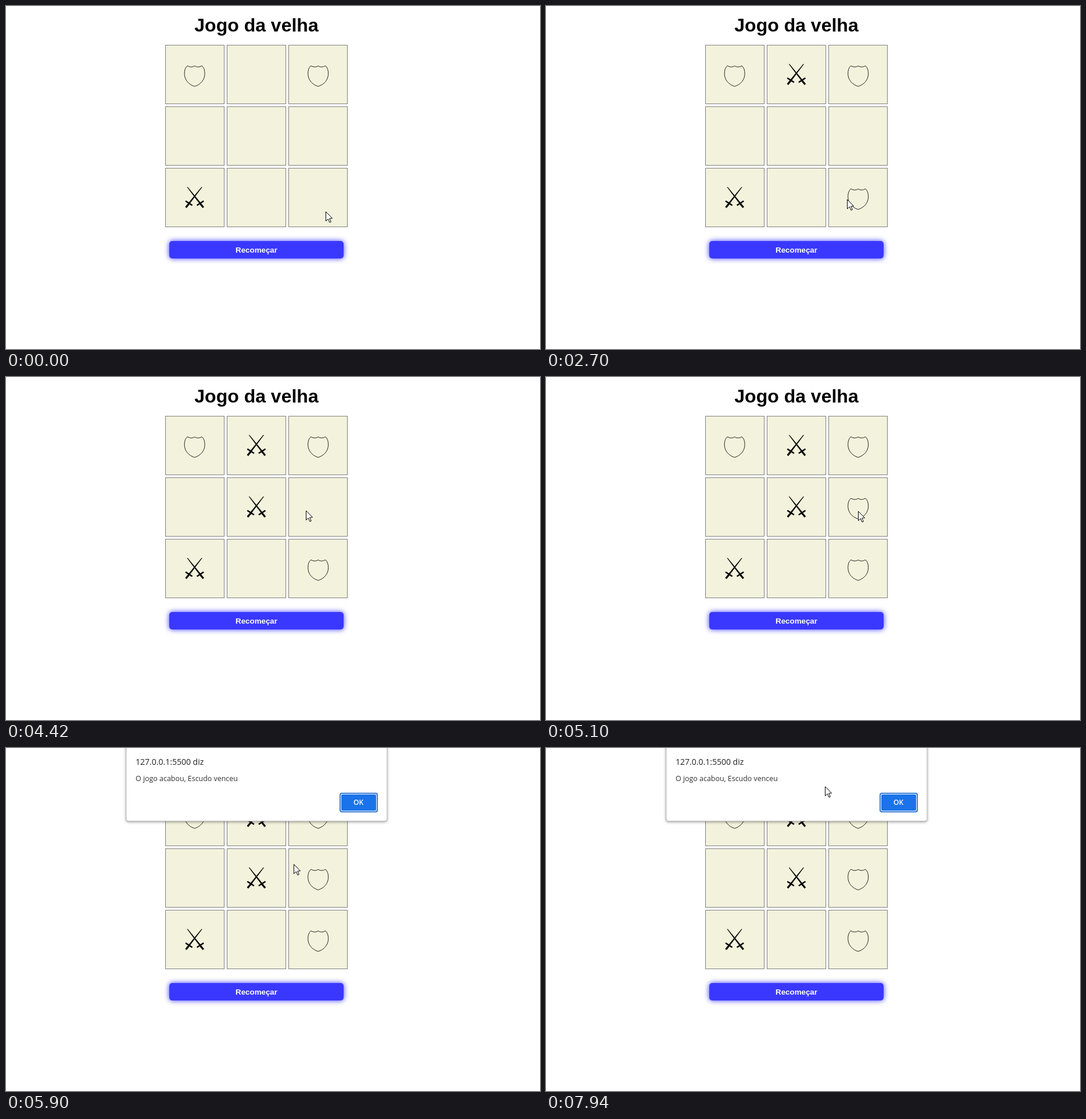
These frames come from a looping animation (919 by 591 pixels, 7.99 s). An HTML page with a canvas:

```html
<!DOCTYPE html>
<html lang="pt">
<head>
<meta charset="utf-8">
<title>Jogo da velha</title>
<style>
  html, body { margin: 0; width: 100%; height: 100%; overflow: hidden; background: #fff; }
  canvas { display: block; }
</style>
</head>
<body>
<canvas id="stage" width="919" height="591"></canvas>
<script>
const ctx = document.getElementById('stage').getContext('2d');
const LOOP = 7990;
const ARIAL = '"Liberation Sans", Arial, sans-serif';
const DIALOG_FONT = '"Open Sans", "Noto Sans", sans-serif';

const smooth = u => u * u * (3 - 2 * u);
const out = power => u => 1 - (1 - u) ** power;

// Pointer moves: first step, last step, destination, easing
const START = [550, 354];
const moves = [
  [70, 70, 431, 140],
  [520, 600, 431, 122],
  [1320, 2090, 511, 309],
  [2160, 2300, 518, 333],
  [3100, 3860, 431, 236],
  [3930, 3930, 431, 239],
  [4140, 4420, 516, 230],
  [4490, 4700, 537, 231, out(1.5)],
  [5700, 6390, 306, 62],
  [6460, 6460, 301, 66],
  [6530, 6820, 234, 66, out(1.63)],
  [7020, 7790, 414, 62],
  [7860, 7860, 446, 66],
  [7940, 7940, 480, 66]
];

// Pieces: drawing, column, row, time of the click
const pieces = [
  [shield, 0, 0, -100], [shield, 2, 0, -100], [swords, 0, 2, -100],
  [swords, 1, 0, 920], [shield, 2, 2, 2630],
  [swords, 1, 1, 4000], [shield, 2, 1, 5030]
];

function pointerAt(t) {
  let [x, y] = START;
  for (const [from, to, tx, ty, ease = smooth] of moves) {
    if (t < from) break;
    const count = Math.round((to - from) / 70) + 1;
    const step = (to - from) / (count - 1) || 1;
    const k = Math.min(count, Math.floor((t - from) / step + 0.01) + 1);
    const u = ease(k / count);
    x += (tx - x) * u;
    y += (ty - y) * u;
  }
  return [Math.round(x), Math.round(y)];
}

function polygon(points) {
  ctx.beginPath();
  points.forEach(([x, y]) => ctx.lineTo(x, y));
  ctx.closePath();
}

function box(x, y, w, h, radius, fill) {
  ctx.beginPath();
  ctx.roundRect(x, y, w, h, radius);
  ctx.fillStyle = fill;
  ctx.fill();
}

function text(str, x, y, font, color, align = 'left') {
  ctx.font = font;
  ctx.fillStyle = color;
  ctx.textAlign = align;
  ctx.fillText(str, x, y);
}

function glow(color, blur, dy = 0) {
  ctx.shadowColor = color;
  ctx.shadowBlur = blur;
  ctx.shadowOffsetY = dy;
}

function shield() {
  ctx.beginPath();
  ctx.moveTo(0, 35.5);
  for (const s of [-1, 1]) {
    ctx.moveTo(0, 36);
    ctx.bezierCurveTo(s * 10, 33, s * 17.5, 25, s * 17.5, 14);
    ctx.bezierCurveTo(s * 17.5, 8, s * 16, 3.5, s * 12.5, 0.5);
    ctx.quadraticCurveTo(s * 6, 4.5, 0, 0.8);
  }
  ctx.strokeStyle = '#222';
  ctx.lineWidth = 1;
  ctx.stroke();
}

function swords() {
  ctx.fillStyle = '#000';
  ctx.strokeStyle = '#000';
  ctx.lineWidth = 2.6;
  for (const s of [-1, 1]) {
    polygon([[s * 13.3, -2.8], [s * 11.7, -2.6], [-s * 16.2, 31.6], [-s * 13.8, 33.4]]);
    ctx.fill();
    ctx.beginPath();
    ctx.moveTo(s * 15.6, 21.5);
    ctx.lineTo(s * 4, 29);
    ctx.moveTo(s * 10, 27);
    ctx.lineTo(s * 15, 32.7);
    ctx.stroke();
  }
}

function drawBoard(t) {
  text('Jogo da velha', 431, 44, 'bold 32px ' + ARIAL, '#000', 'center');
  for (let i = 0; i < 9; i++) {
    const x = 274 + (i % 3) * 106, y = 67 + Math.floor(i / 3) * 106;
    ctx.fillStyle = '#808080';
    ctx.fillRect(x, y, 102, 102);
    ctx.fillStyle = '#f3f2dc';
    ctx.fillRect(x + 1, y + 1, 100, 100);
  }
  for (const [draw, col, row, time] of pieces) {
    if (t < time) continue;
    ctx.save();
    ctx.globalAlpha = t < time + 70 ? 0.7 : 1;
    ctx.translate(324.6 + col * 106.3, 102.5 + row * 106);
    draw();
    ctx.restore();
  }
  ctx.save();
  glow('#3a38ff', 10);
  box(281, 405, 300, 30, 5, '#3a38ff');
  ctx.restore();
  text('Recomeçar', 431, 425, 'bold 13.333px ' + ARIAL, '#fff', 'center');
}

function drawDialog(t) {
  if (t < 5170) return;
  const [dy, alpha] = t < 5240 ? [-14, 0.65] : t < 5310 ? [-4, 0.975] : [0, 1];
  ctx.save();
  ctx.translate(0, dy);
  ctx.globalAlpha = alpha;
  ctx.save();
  glow('rgba(0,0,0,0.4)', 5, 1);
  box(206.5, -20, 449.5, 146.5, 4, '#b4b4b4');
  ctx.restore();
  box(207.3, -20, 448, 145.6, 3.5, '#fff');
  text('127.0.0.1:5500 diz', 223, 29, '14px ' + DIALOG_FONT, '#202124');
  text('O jogo acabou, Escudo venceu', 223, 57, '12.43px ' + DIALOG_FONT, '#303134');
  box(574, 77, 66, 34, 4, '#3b7fd6');
  box(576, 79, 62, 30, 3, '#fff');
  box(577, 80, 60, 28, 2.5, '#1a73e8');
  text('OK', 606.5, 98, '600 12px ' + DIALOG_FONT, '#fff', 'center');
  ctx.restore();
}

function drawPointer(t) {
  const [x, y] = pointerAt(t);
  ctx.save();
  ctx.translate(x, y);
  if (t > 5310 && y > 43 && y < 64) {
    ctx.fillStyle = '#000';
    ctx.fillRect(0, -8, 1, 16);
    for (const row of [-9, 8]) {
      ctx.fillRect(-3, row, 3, 1);
      ctx.fillRect(1, row, 3, 1);
    }
  } else {
    ctx.translate(0.5, 0.5);
    polygon([[0, 0], [0, 16], [3.8, 12.5], [6.5, 18.5], [8.8, 17.5], [6.2, 11.6], [11, 11.3]]);
    ctx.fillStyle = '#fff';
    ctx.fill();
    ctx.strokeStyle = '#000';
    ctx.lineWidth = 1;
    ctx.stroke();
  }
  ctx.restore();
}

function render(now) {
  const t = now % LOOP;
  ctx.fillStyle = '#fff';
  ctx.fillRect(0, 0, 919, 591);
  drawBoard(t);
  drawDialog(t);
  drawPointer(t);
}

const begin = performance.now();
function tick() {
  render(performance.now() - begin);
  requestAnimationFrame(tick);
}
tick();
</script>
</body>
</html>
```
